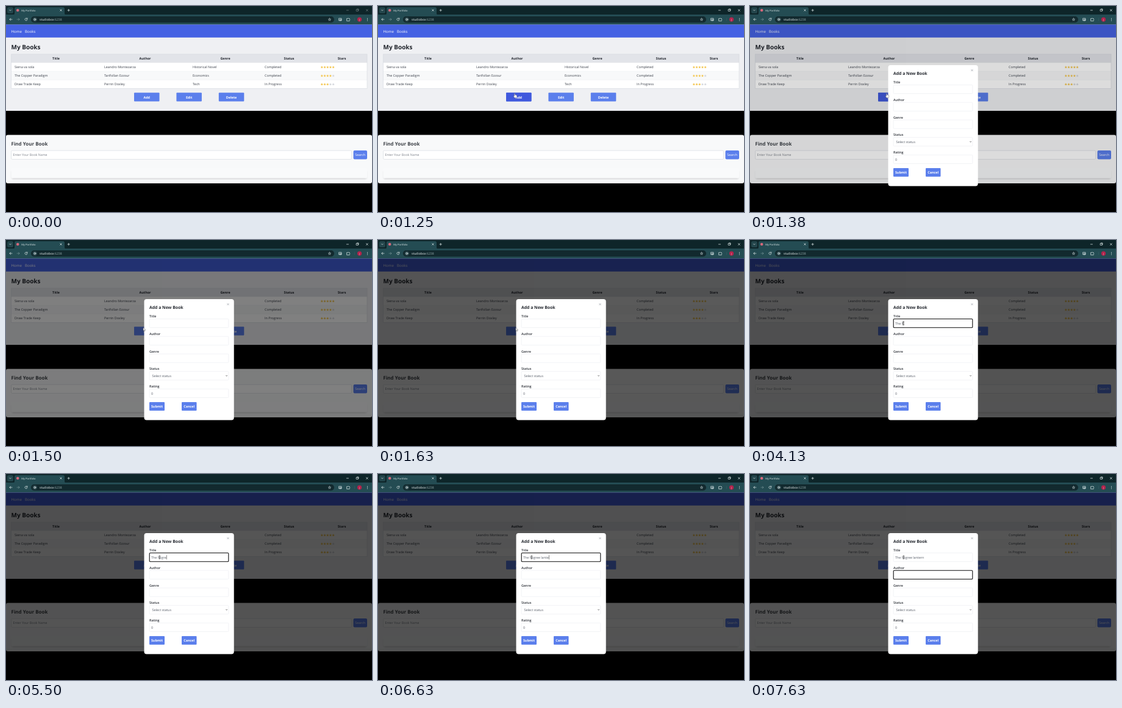
Recreate the animation shown at these times as an HTML page. Size 600 by 338 pixels, loop 8 s.

```html
<!DOCTYPE html>
<html lang="en">
<head>
<meta charset="utf-8">
<title>My Portfolio</title>
<style>
html, body { margin: 0; width: 100%; height: 100%; overflow: hidden; background: #000; }
svg { display: block; width: 100vw; height: 100vh; }
text { font: 5.4px "Open Sans", "Noto Sans", sans-serif; text-rendering: geometricPrecision; white-space: pre; }
.b { font-weight: 700; }
.mid { text-anchor: middle; }
.cell { fill: #3a3f49; }
.head { fill: #23272f; }
.btn { fill: #5b7fec; }
.white { fill: #fff; }
.label { font-weight: 600; fill: #2b2f36; }
.value { fill: #555b66; }
.field { fill: #fff; stroke: #e4e7ec; stroke-width: .5; }
.ring { fill: none; stroke: #111; stroke-width: 1.1; }
.icon { fill: none; stroke: #e3ecec; stroke-width: .7; stroke-linecap: round; stroke-linejoin: round; }

.controls, .hover, .shade, .modal, .arrow, .hand, .beam, .ring, .blink, .cursor {
  animation: 8s step-end infinite;
}
.controls { animation-name: wake; }
.hover { animation-name: hover; }
.shade { animation-name: shade; }
.modal { animation-name: open; }
.ring.one { animation-name: focusOne; }
.ring.two { animation-name: focusTwo; }
.blink { animation-name: blink; }
.arrow { animation-name: arrow; }
.hand { animation-name: hand; }
.beam { animation-name: beam; }
.cursor { animation-name: travel; animation-timing-function: ease-in-out; }

@keyframes wake { 0% { opacity: .45 } 1.5625%, 100% { opacity: 1 } }
@keyframes hover { 0% { opacity: 0 } 12.5% { opacity: 1 } 18.75%, 100% { opacity: 0 } }
@keyframes shade {
  0% { opacity: 0 } 17.1875% { opacity: .14 } 18.75% { opacity: .5 }
  20.3125% { opacity: .65 } 21.875%, 100% { opacity: .67 }
}
@keyframes open { 0% { opacity: 0 } 17.1875%, 100% { opacity: 1 } }
@keyframes focusOne { 0% { opacity: 0 } 28.125% { opacity: 1 } 89.0625%, 100% { opacity: 0 } }
@keyframes focusTwo { 0% { opacity: 0 } 89.0625%, 100% { opacity: 1 } }
@keyframes blink { 0% { opacity: 0 } 89.0625% { opacity: 1 } 95.3125%, 100% { opacity: 0 } }
@keyframes arrow {
  0% { opacity: 0 } 3.125% { opacity: 1 } 12.5% { opacity: 0 }
  18.75% { opacity: 1 } 26.5625%, 100% { opacity: 0 }
}
@keyframes hand { 0% { opacity: 0 } 12.5% { opacity: 1 } 18.75%, 100% { opacity: 0 } }
@keyframes beam { 0% { opacity: 0 } 26.5625%, 100% { opacity: 1 } }
@keyframes travel {
  0%, 3.125% { transform: translate(300px, 244px) }
  12.5%, 17.1875% { transform: translate(224px, 143.3px) }
  20.3125%, 23.4375% { transform: translate(225.7px, 143.5px) }
  28.125%, 100% { transform: translate(251.8px, 136.6px) }
}
</style>
</head>
<body>
<svg viewBox="0 0 600 338" preserveAspectRatio="none">
  <defs>
    <path id="star" d="M0-2.3 .6-.75 2.2-.7.95.3 1.4 1.9 0 1-1.4 1.9-.95.3-2.2-.7-.6-.75Z"/>
    <filter id="soft" x="-5%" y="-60%" width="110%" height="240%"><feGaussianBlur stdDeviation="1.7"/></filter>
  </defs>

  <!-- browser -->
  <rect width="600" height="15" fill="#0e2529"/>
  <rect y="14" width="600" height="16.6" fill="#244c53"/>
  <rect x="2" y="2" width="10" height="10" rx="2.6" fill="#23454b"/>
  <path class="icon" d="M5.7 6.4 7 7.7 8.3 6.4"/>
  <path d="M12 14.3Q14 14.3 14 12V4.5Q14 2 16.500 2H93.500Q96 2 96 4.500V12Q96 14.300 98 14.300Z" fill="#244c53"/>
  <circle cx="19.200" cy="7" r="2.300" fill="#d8687b"/>
  <text x="25.300" y="8.900" style="font-size:4.100px" fill="#e6eeee">My Portfolio</text>
  <path class="icon" d="m88.700 5.700 2.600 2.600m0-2.600-2.600 2.600M102.700 5.300v3.400M101 7h3.400"/>
  <path class="icon controls" d="M558.300 7h3.200M574.500 5.600h2.800v2.800h-2.800zM575.300 5.600V4.900h2.700v2.700h-.7M590.400 5.500l3 3m0-3-3 3"/>

  <path class="icon" d="M10 22H6m1.700-1.800L5.900 22l1.800 1.800M34.700 20.900a2 2 0 1 0 .2 1.700M35 19.800v1.400h-1.400"/>
  <path class="icon" opacity=".4" d="M18 22h4m-1.700-1.800 1.800 1.800-1.800 1.800"/>
  <rect x="41" y="17" width="497" height="10.200" rx="5.100" fill="#12292e"/>
  <circle cx="47.300" cy="22.100" r="3.700" fill="#29454b"/>
  <circle class="icon" cx="47.300" cy="22.100" r="1.600"/>
  <path class="icon" d="M46.700 22.100h1.200"/>
  <text x="55" y="24" style="font-size:5.100px" fill="#eef4f4">studiobox<tspan fill="#9aaeb0">:6238</tspan></text>
  <use href="#star" x="530.500" y="22.300" class="icon" style="stroke-width:.5"/>
  <path class="icon" d="M546 20.200h4v3.700h-4zM547.500 22h2.200v1.800h-2.200z"/>
  <path class="icon" d="M559 20.600h1.300q.7-1.600 1.500 0h1.400v1.300q1.500.7 0 1.500v1.200H559z"/>
  <path d="M571.300 19.500v5" stroke="#42686e" stroke-width=".5"/>
  <circle cx="579.500" cy="22.100" r="3.600" fill="#b3234c"/>
  <text class="mid white" x="579.500" y="23.600" style="font-size:4px">J</text>
  <g fill="#e3ecec"><circle cx="592.500" cy="20.200" r=".55"/><circle cx="592.500" cy="22.100" r=".55"/><circle cx="592.500" cy="24" r=".55"/></g>

  <!-- page -->
  <rect y="30.500" width="600" height="141.500" fill="#eff0f3"/>
  <rect y="30.500" width="600" height="21.200" fill="#4562e3"/>
  <g class="white">
    <text x="8.600" y="43.900" style="font-size:6.100px">Home</text>
    <text x="31" y="43.900" style="font-size:6.100px">Books</text>
  </g>
  <text class="b" x="8.500" y="71" style="font-size:10px" fill="#20242b">My Books</text>
  <rect x="8.700" y="79" width="583.300" height="56.400" fill="#fff"/>
  <rect x="8.700" y="79" width="583.300" height="14" fill="#e2e4e9"/>
  <rect x="8.700" y="107.200" width="583.300" height="14.100" fill="#f8f9fa"/>
  <path d="M8.700 93h583.300M8.700 107.200h583.300M8.700 121.300h583.300" stroke="#e5e7eb" stroke-width=".4"/>
  <rect x="8.700" y="79" width="583.300" height="56.400" fill="none" stroke="#d3d7de" stroke-width=".6"/>
  <g id="table"></g>
  <g id="actions"></g>
  <g class="hover">
    <rect x="210" y="142.300" width="41.500" height="14.300" rx="1" fill="#4059dd"/>
    <text class="b mid white" x="230.700" y="151.600">Add</text>
  </g>

  <!-- search panel -->
  <rect y="211.500" width="600" height="79.500" rx="3" fill="#f8f9fa"/>
  <text class="b" x="8.500" y="229" style="font-size:8px" fill="#3d4147">Find Your Book</text>
  <rect x="8.700" y="237.200" width="557.800" height="14.300" rx="1.500" fill="#fff" stroke="#d3d7de" stroke-width=".6"/>
  <text x="11.500" y="246.400" style="font-size:5.300px" fill="#7d828b">Enter Your Book Name</text>
  <rect class="btn" x="569.500" y="237" width="22.500" height="14.500" rx="2"/>
  <text class="mid white" x="580.700" y="246.400">Search</text>
  <rect x="9.500" y="270" width="581.500" height="14" rx="2" fill="#000" opacity=".15" filter="url(#soft)"/>
  <rect x="8.500" y="266" width="583.500" height="16.500" rx="2" fill="#f9fafb"/>

  <rect class="shade" y="30.500" width="600" height="307.500"/>

  <!-- dialog -->
  <g class="modal">
    <rect x="226.500" y="97" width="147.200" height="198.500" rx="4" fill="#fff"/>
    <text class="b" x="235" y="113.100" style="font-size:6.850px" fill="#23272e">Add a New Book</text>
    <path d="m362.400 103.900 3.200 3.200m0-3.200-3.200 3.200" stroke="#8b9099" stroke-width=".6"/>
    <g id="form"></g>
    <text class="value" x="239.500" y="224.700">Select status</text>
    <path d="m360.300 222 1.300 1.400 1.300-1.400" fill="none" stroke="#444" stroke-width=".7"/>
    <text class="value" x="238" y="253.500">0</text>
    <rect class="btn" x="235" y="266" width="25" height="14" rx="1"/>
    <text class="b mid white" x="247.500" y="275">Submit</text>
    <rect class="btn" x="288" y="266" width="24.500" height="14" rx="1"/>
    <text class="b mid white" x="300.200" y="275">Cancel</text>
    <rect class="ring one" x="235.200" y="129.500" width="129.600" height="14.200" rx="1.300"/>
    <rect class="ring two" x="235.200" y="158.300" width="129.600" height="14.200" rx="1.300"/>
    <text class="value" id="typed" x="238" y="138.700"></text>
    <rect id="caret" x="238.200" y="133.200" width=".5" height="7" fill="#111"/>
    <rect class="blink" x="238.200" y="162" width=".5" height="7" fill="#111"/>
  </g>

  <g class="cursor">
    <path class="arrow" d="M0 0V5.600L1.300 4.400 2.200 6.400 3.100 6 2.200 4.100H4Z" fill="#fff" stroke="#111" stroke-width=".35"/>
    <path class="hand" d="M-.6.3Q0-.4.6.3V2.600L3 3.100Q4 3.400 3.800 4.500L3.200 7.300H-.3L-2.200 4.600Q-2 3.700-.6 4.600Z" fill="#fff" stroke="#222" stroke-width=".35"/>
    <path class="beam" d="M-1.200-2.700Q0-2.700 0-2Q0-2.700 1.200-2.700M0-2V2M-1.200 2.700Q0 2.700 0 2Q0 2.700 1.200 2.700" fill="none" stroke="#111" stroke-width=".65"/>
  </g>
</svg>

<script>
const $ = id => document.getElementById(id);
const text = (x, y, cls, s) => `<text x="${x}" y="${y}" class="${cls}">${s}</text>`;

const heads = [["Title", 82], ["Author", 228], ["Genre", 359.5], ["Status", 464], ["Stars", 550.5]];
const columns = [14, 161, 306, 424];
const books = [
  ["Siena va sola", "Leandro Montezarza", "Historical Novel", "Completed", 5],
  ["The Copper Paradigm", "Tarifollan Ezzour", "Economics", "Completed", 4],
  ["Draw Trade Keep", "Perrin Doxley", "Tech", "In Progress", 3]
];

const stars = (count, y) => [0, 1, 2, 3, 4].map(i =>
  `<use href="#star" x="${517.8 + i * 4.7}" y="${y}" fill="${i < count ? "#f3c54c" : "#d3d6dc"}"/>`).join("");

$("table").innerHTML =
  heads.map(([s, x]) => text(x, 88.1, "b mid head", s)).join("") +
  books.map((book, r) => {
    const y = 102.1 + r * 14.1;
    return columns.map((x, c) => text(x, y, "cell", book[c])).join("") + stars(book[4], y - 1.7);
  }).join("");

$("actions").innerHTML = ["Add", "Edit", "Delete"].map((s, i) => {
  const x = 210 + i * 69.4;
  return `<rect class="btn" x="${x}" y="142.3" width="41.5" height="14.3" rx="1"/>` +
    text(x + 20.7, 151.6, "b mid white", s);
}).join("");

$("form").innerHTML = ["Title", "Author", "Genre", "Status", "Rating"].map((s, i) => {
  const y = 129.5 + i * 28.72;
  return text(235, y - 2.2, "label", s) +
    `<rect class="field" x="235.2" y="${y}" width="129.6" height="14.2" rx="1"/>`;
}).join("");

// Key presses, counted in ticks of 125 ms
const tick = 125, loop = 8000;
const phrase = "The filigree lantern";
const keys = [23, 26, 28, 30, 33, 35, 39, 41, 42, 43, 44, 45, 46, 48, 49, 51, 52, 53, 54, 55];
const typed = $("typed"), caret = $("caret");
let start, shown = -1;

function draw(now) {
  start ??= now;
  const t = (now - start) % loop / tick;
  const count = keys.filter(k => k <= t).length;
  if (count !== shown) {
    shown = count;
    typed.textContent = phrase.slice(0, count);
    caret.setAttribute("x", 238.2 + (count ? typed.getComputedTextLength() : 0));
  }
  caret.setAttribute("opacity", t >= 18 && t < 57 ? 1 : 0);
  requestAnimationFrame(draw);
}
requestAnimationFrame(draw);
</script>
</body>
</html>
```
